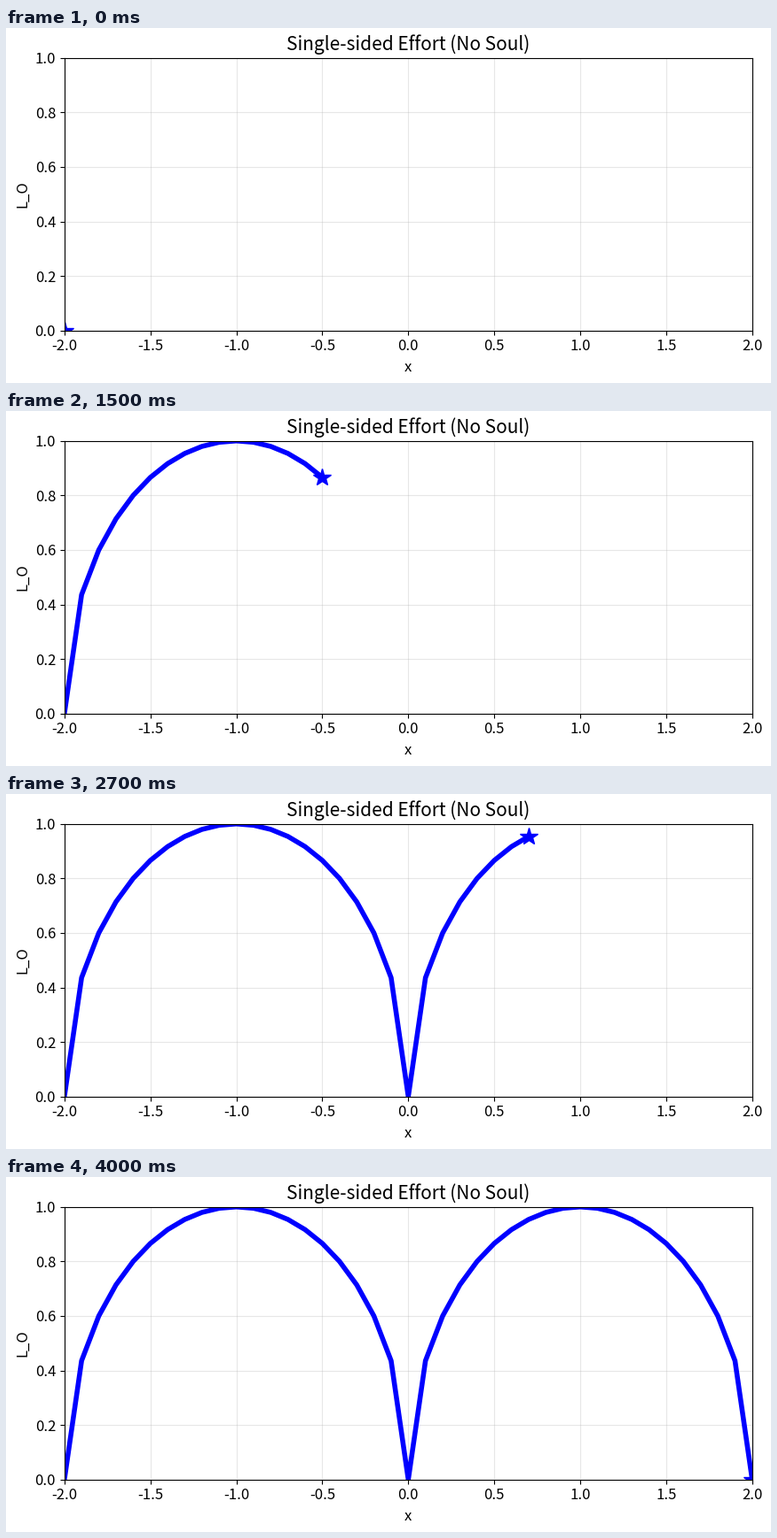
Animation, 862 px wide and 401 px high, one loop 4100 ms. Source, as a matplotlib script:

```python
import numpy as np
import matplotlib.pyplot as plt
from matplotlib.animation import FuncAnimation

W, H, DPI = 862, 401, 100
LEFT, RIGHT, TOP, BOTTOM = 65.8, 840.8, 33.75, 341.75   # plot edges, px from the top left
STEPS = 41

plt.rcParams.update({
    "font.family": "Noto Sans CJK JP",
    "font.size": 12,
    "axes.unicode_minus": False,
})

x = np.linspace(-2, 2, STEPS)
y = np.sqrt(np.clip(1 - (np.abs(x) - 1) ** 2, 0, None))

# The tiny margin keeps the pixel size from rounding down.
fig = plt.figure(figsize=(W / DPI + 1e-9, H / DPI + 1e-9), dpi=DPI, facecolor="white")
ax = fig.add_axes([LEFT / W, 1 - BOTTOM / H, (RIGHT - LEFT) / W, (BOTTOM - TOP) / H])
ax.set_xlim(-2, 2)
ax.set_ylim(0, 1)
ax.set_xticks(np.arange(-2, 2.1, 0.5))
ax.set_yticks(np.arange(0, 1.1, 0.2))
ax.grid(True, alpha=0.3)
ax.set_title("Single-sided Effort (No Soul)", fontsize=15)


def label(px, py, text, **kw):
    fig.text(px / W, 1 - py / H, text, ha="center", **kw)


label(453, 388, "x", va="baseline")
label(19, 188, "L_O", va="center", rotation=90)

trail, = ax.plot([], [], color="blue", lw=4)
star, = ax.plot([], [], "*", color="blue", ms=15)


def draw(i):
    trail.set_data(x[:i + 1], y[:i + 1])
    star.set_data([x[i]], [y[i]])
    return trail, star


anim = FuncAnimation(fig, draw, frames=STEPS, interval=100, repeat=True, repeat_delay=0)
plt.show()
```
